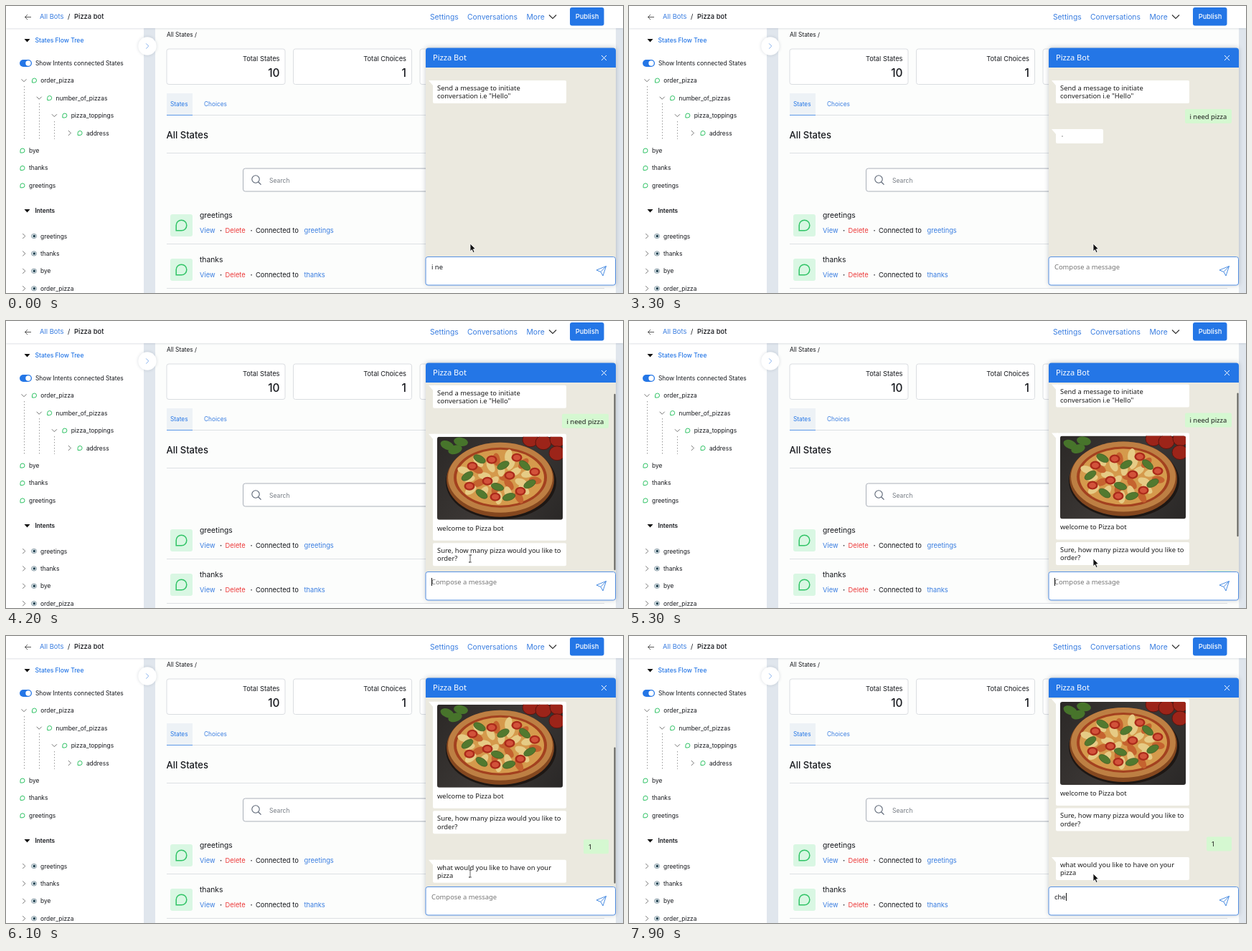
An HTML page with a canvas that plays this animation: 860 px wide and 401 px high, repeating every 8000 ms.

```html
<!DOCTYPE html>
<html lang="en">
<head>
<meta charset="utf-8">
<title>Bot builder chat</title>
<style>
html, body { margin: 0; width: 100%; height: 100%; overflow: hidden; background: #fff; }
canvas { display: block; }
</style>
</head>
<body>
<canvas id="stage" width="860" height="401"></canvas>
<script>
const ctx = document.getElementById('stage').getContext('2d');
const LOOP = 8000;
const UI = 'Inter, sans-serif', CHAT = '"Noto Sans", sans-serif';
const BLUE = '#2476e6', LINK = '#397de0', INK = '#16181d', GREEN = '#2fc365';

const TYPED = [[0, 'i ne'], [100, 'i nee'], [300, 'i need'], [500, 'i need '], [1000, 'i need p'],
  [1700, 'i need pi'], [1900, 'i need piz'], [2000, 'i need pizz'], [2100, 'i need pizza'],
  [2300, ''], [5100, '1'], [5300, ''], [7100, 'c'], [7300, 'ch'], [7500, 'che']];
const CARET_ON = [[100, 1100], [1200, 2800], [3500, 4700], [5100, 5900], [6900, LOOP]];
const IBEAM_ON = [[3800, 5300], [5900, 6900]];
const SENT = 2300, WAIT = 2450, ANSWER = 3700, SENT2 = 5300, ANSWER2 = 5900;

const clamp = v => Math.max(0, Math.min(1, v));
const easeOut = u => 1 - (1 - clamp(u)) ** 3;
const within = (spans, t) => spans.some(([a, b]) => t >= a && t < b);

function text(s, x, y, size, color = INK, { weight = 400, font = UI, align = 'left' } = {}) {
  ctx.font = `${weight} ${size}px ${font}`;
  ctx.textAlign = align;
  ctx.fillStyle = color;
  ctx.fillText(s, x, y + size * 0.36);
}
const chatText = (s, x, y, color = '#1c1c1c') => text(s, x, y, 9.4, color, { font: CHAT });

function box(x, y, w, h, r, fill, stroke, lw = 1) {
  ctx.beginPath();
  ctx.roundRect(x, y, w, h, r);
  if (fill) { ctx.fillStyle = fill; ctx.fill(); }
  if (stroke) { ctx.strokeStyle = stroke; ctx.lineWidth = lw; ctx.stroke(); }
}
function path(points, stroke, lw = 1, fill) {
  ctx.beginPath();
  points.forEach(([x, y]) => ctx.lineTo(x, y));
  if (fill) { ctx.closePath(); ctx.fillStyle = fill; ctx.fill(); }
  if (stroke) { ctx.strokeStyle = stroke; ctx.lineWidth = lw; ctx.stroke(); }
}
function oval(x, y, rx, ry, fill, stroke, lw = 1, turn = 0) {
  ctx.beginPath();
  ctx.ellipse(x, y, rx, ry, turn, 0, 7);
  if (fill) { ctx.fillStyle = fill; ctx.fill(); }
  if (stroke) { ctx.strokeStyle = stroke; ctx.lineWidth = lw; ctx.stroke(); }
}
function shadowed(color, blur, draw) {
  ctx.save();
  ctx.shadowColor = color;
  ctx.shadowBlur = blur;
  draw();
  ctx.restore();
}
const rule = (x, y, w, color = '#dde0e4') => { ctx.fillStyle = color; ctx.fillRect(x, y, w, 1); };
const chevronDown = (x, y, w, color, lw) => path([[x - w, y - w / 2], [x, y + w / 2], [x + w, y - w / 2]], color, lw);
const chevronRight = (x, y, w, color, lw) => path([[x - w / 2, y - w], [x + w / 2, y], [x - w / 2, y + w]], color, lw);
const triangle = (x, y) => path([[x - 4, y - 2], [x + 4, y - 2], [x, y + 2.5]], null, 0, '#111');

function speech(x, y, r, lw) {
  ctx.beginPath();
  ctx.arc(x, y, r, Math.PI, Math.PI * 2.5);
  ctx.lineTo(x - r, y + r);
  ctx.closePath();
  ctx.strokeStyle = GREEN;
  ctx.lineWidth = lw;
  ctx.stroke();
}

function topBar() {
  shadowed('rgba(40,55,75,.25)', 3, () => box(0, 0, 860, 31, 0, '#fff'));
  path([[35, 15.5], [26.5, 15.5]], '#444', .9);
  path([[30, 12], [26.5, 15.5], [30, 19]], '#444', .9);
  text('All Bots', 47, 15, 9.4, LINK);
  text('/', 86, 15, 9.4);
  text('Pizza bot', 95, 15, 9.4, INK, { weight: 500 });
  text('Settings', 591, 15, 10.3, LINK);
  text('Conversations', 643, 15, 10.3, LINK);
  text('More', 725.5, 15, 10.3, LINK);
  chevronDown(762, 15, 5, '#333', 1.2);
  box(786, 2, 47.5, 25.5, 3, BLUE);
  text('Publish', 810, 15, 9.3, '#fff', { weight: 500, align: 'center' });
}

function sidebar() {
  box(0, 31, 192, 370, 0, '#fff');
  triangle(29.5, 48);
  text('States Flow Tree', 40.5, 48, 8.55, BLUE, { weight: 500 });
  box(19, 75, 17, 10, 5, BLUE);
  oval(31, 80, 3.7, 3.7, '#fff');
  text('Show Intents connected States', 41, 80, 8.4);

  ctx.setLineDash([1.5, 2.5]);
  [[25, 112], [46, 136], [67, 161]].forEach(([x, y]) => path([[x + .5, y], [x + .5, 186]], '#999', 1));
  ctx.setLineDash([]);
  ['order_pizza', 'number_of_pizzas', 'pizza_toppings', 'address'].forEach((name, i) => {
    const x = 25 + i * 21.2, y = 104 + i * 24.5;
    if (i < 3) chevronDown(x, y, 3.5, '#666', .9);
    else chevronRight(x, y, 3.5, '#666', .9);
    speech(x + 14.5, y, 3, 1);
    text(name, x + 23.3, y, 8.4);
  });
  ['bye', 'thanks', 'greetings'].forEach((name, i) => {
    const y = 202 + i * 24.4;
    speech(23, y, 3, 1);
    text(name, 32, y, 8.4);
  });

  triangle(29.5, 286);
  text('Intents', 40.5, 286, 8.3, INK, { weight: 600 });
  ['greetings', 'thanks', 'bye', 'order_pizza'].forEach((name, i) => {
    const y = 321.5 + i * 24.4;
    chevronRight(25, y, 3.5, '#666', .9);
    oval(39, y, 3.6, 3.2, '#dbe6ea', '#7b8f9a', .8);
    oval(39.3, y, 1.7, 1.7, '#1d3d4c');
    text(name, 48, y, 8.4);
  });
}

function card(x, label, value) {
  box(x + .5, 60, 165, 49.5, 3, '#fff', '#dadde1');
  text(label, x + 158, 74, 9.3, INK, { align: 'right' });
  text(value, x + 158, 93.5, 15.4, INK, { weight: 500, align: 'right' });
}

function stateRow(name, y) {
  box(229, y - 2, 31, 31, 3, '#d9f7e3');
  speech(244.5, y + 13.5, 7.3, 1.5);
  text(name, 270, y - .3, 10.3);
  const ly = y + 20.5;
  text('View', 270, ly, 9.3, LINK);
  text('·', 298, ly, 9.4, INK, { weight: 700 });
  text('Delete', 305.5, ly, 9.3, '#ec3a3a');
  text('·', 340.5, ly, 9.4, INK, { weight: 700 });
  text('Connected to', 348, ly, 9.4);
  text(name, 415.5, ly, 9.3, LINK);
}

function mainArea() {
  box(208, 31, 642, 370, 0, '#fcfdfc');
  text('All States /', 224, 40.5, 8.3);
  card(223.5, 'Total States', '10');
  card(400, 'Total Choices', '1');
  card(576.5, '', '');
  box(224, 122, 36, 31, 0, '#edf2f6');
  rule(224, 152, 610);
  rule(224, 152, 36, '#5c98e8');
  text('States', 229, 137.5, 8.3, BLUE);
  text('Choices', 276, 137.5, 8.3, LINK);
  text('All States', 223.5, 180.6, 13, INK, { weight: 500 });
  rule(224, 205, 610);
  box(330.5, 227, 398, 32, 3, '#fff', '#aab0b9');
  oval(348, 242, 5.2, 5.2, null, '#5a6474', 1.1);
  path([[351.8, 246], [355.5, 249.7]], '#5a6474', 1.2);
  text('Search', 367, 243.5, 8.6, '#757b83');
  stateRow('greetings', 293);
  rule(224, 332, 610);
  stateRow('thanks', 355);
  rule(224, 394, 610);
  shadowed('rgba(40,60,90,.18)', 4, () => oval(197, 56, 12.7, 12.7, '#fff'));
  chevronRight(197, 56, 3.6, '#86b2ee', 1);
}

function bubble(y, w, h, tail = true) {
  box(595, y, w, h, 2, '#fff');
  if (tail) path([[589, y], [598, y], [598, y + 8], [595, y + 7]], null, 0, '#fff');
}
function reply(s, x, y) {
  box(x, y, 840 - x, 20, 2, '#d5f8d1');
  chatText(s, x + 6.5, y + 10.5);
}

function waiting(y, elapsed) {
  bubble(y, 66, 20);
  const p = elapsed % 800;
  for (let i = 0; i < 3; i++) {
    const grow = clamp((p - i * 100) / 150) * clamp((800 - p) / 200);
    if (!grow) continue;
    ctx.globalAlpha = grow;
    oval(604 + i * 6, y + 10, 2.8 * grow, 2.8 * grow, '#111');
    ctx.globalAlpha = 1;
  }
}

function pizza(x, y) {
  ctx.save();
  ctx.beginPath();
  ctx.roundRect(x, y, 175, 116, 3);
  ctx.clip();
  ctx.translate(x, y);
  const board = ctx.createLinearGradient(0, 0, 175, 116);
  board.addColorStop(0, '#2b2826');
  board.addColorStop(.5, '#3c3836');
  board.addColorStop(1, '#2a2827');
  ctx.fillStyle = board;
  ctx.fillRect(0, 0, 175, 116);
  [[130, 4], [148, 8], [168, 4], [167, 23]].forEach(([a, b]) => oval(a, b, 11, 10, '#9c2419', '#5c140e'));
  [[14, 12, .4], [25, 18, -.3], [33, 7, .2]].forEach(([a, b, r]) => oval(a, b, 10, 6, '#47742b', null, 0, r));
  oval(89, 63, 77, 52, '#1d1714');
  oval(88, 60, 75, 52, '#84471f');
  oval(88, 57, 73, 49, '#bd7f43');
  oval(88, 57, 65, 42, '#a3411f');
  oval(88, 57, 61, 39, '#d59a4c');
  for (let i = 0; i < 26; i++) {
    const a = i * 2.4, d = Math.sqrt((i + .5) / 26);
    oval(88 + 54 * d * Math.cos(a), 57 + 33 * d * Math.sin(a), 9, 5, i % 3 ? '#e6cb85' : '#c5632f', null, 0, a);
  }
  [[49, 41], [76, 32], [111, 29], [136, 49], [101, 54], [70, 62], [45, 69], [116, 76], [81, 84]].forEach(([a, b]) => {
    oval(a, b, 7.5, 6, '#ab2a1a');
    oval(a, b, 5, 3.8, '#d2523a');
  });
  [[59, 31, .5], [92, 40, -.5], [122, 40, .7], [84, 70, .3], [42, 55, -.6], [129, 66, -.5], [62, 80, .6], [100, 84, -.3]]
    .forEach(([a, b, r]) => oval(a, b, 9, 4.8, '#52792f', '#3a5a22', .7, r));
  ctx.restore();
}

function scrollAt(t) {
  if (t < ANSWER) return 0;
  if (t < SENT2) return 15 * easeOut((t - ANSWER) / 800);
  if (t < ANSWER2) return 15 + 56 * easeOut((t - SENT2) / 400);
  return 71 + 13 * easeOut((t - ANSWER2) / 600);
}

function messages(t) {
  const scroll = scrollAt(t);
  ctx.save();
  ctx.beginPath();
  ctx.rect(585, 86, 265, 264);
  ctx.clip();
  ctx.save();
  ctx.translate(0, -scroll);
  bubble(104, 186, 32);
  chatText('Send a message to initiate', 601, 114.5);
  chatText('conversation i.e "Hello"', 601, 125.7);
  if (t >= SENT) reply('i need pizza', 775, 144);
  if (t >= WAIT && t < ANSWER) waiting(172, t - WAIT);
  if (t >= ANSWER) {
    bubble(172, 186, 149);
    pizza(601, 176);
    chatText('welcome to Pizza bot', 601, 303.5);
    bubble(324.5, 186, 32, false);
    chatText('Sure, how many pizza would you like to', 601, 335);
    chatText('order?', 601, 346.3);
  }
  if (t >= SENT2) reply('1', 805, 364.5);
  if (t >= SENT2 && t < ANSWER2) waiting(392.5, t - SENT2);
  if (t >= ANSWER2) {
    bubble(393, 186, 32);
    chatText('what would you like to have on your', 601, 403.5);
    chatText('pizza', 601, 414.8);
  }
  ctx.restore();
  if (t >= ANSWER) {
    const max = t < SENT2 ? 15 : t < ANSWER2 ? 71 : 84;
    const length = 259 - .82 * max;
    ctx.globalAlpha = 1 - clamp((t - 7400) / 450);
    box(847.5, 349 - length - (max - scroll) * .86, 2, length, 1, '#5f5f5c');
    ctx.globalAlpha = 1;
  }
  ctx.restore();
}

function composer(t) {
  box(585, 350.5, 264.5, 39.5, 3, '#fff', '#5590e3');
  const typed = TYPED.filter(([at]) => at <= t).pop()[1];
  chatText(typed || 'Compose a message', 593, 364.5, typed ? INK : '#777');
  if (within(CARET_ON, t)) {
    const x = typed ? 593 + ctx.measureText(typed).width : 592.5;
    ctx.fillStyle = '#111';
    ctx.fillRect(Math.round(x), 359, 1, 11);
  }
  path([[823, 369], [836.5, 363.5], [832, 377], [829, 371.5], [823, 369]], '#4a8de2', 1);
  path([[829, 371.5], [836.5, 363.5]], '#4a8de2', 1);
}

function pointer(t) {
  if (within(IBEAM_ON, t)) {
    const beam = [[645, 327], [649, 327], [647, 327], [647, 337], [645, 337], [649, 337]];
    path(beam, '#fff', 1.6);
    path(beam, '#444', .8);
  } else {
    path([[647, 332], [647, 342.8], [649.4, 340.6], [651.2, 344.6], [653, 343.8], [651.3, 339.8], [654.4, 339.5], [647, 332]],
      '#fff', .8, '#111');
  }
}

function chatPanel(t) {
  shadowed('rgba(30,40,60,.25)', 6, () => box(585, 58, 265, 332, 4, '#ebe9df'));
  box(585, 58.5, 265, 27.5, [4, 4, 0, 0], BLUE);
  text('Pizza Bot', 595, 72.5, 11.1, '#fff', { font: CHAT });
  path([[830, 69], [837, 76]], '#fff', 1);
  path([[837, 69], [830, 76]], '#fff', 1);
  messages(t);
  composer(t);
  pointer(t);
}

function render(t) {
  box(0, 0, 860, 401, 0, '#e0e6ed');
  sidebar();
  mainArea();
  topBar();
  chatPanel(t);
}

const start = performance.now();
function tick() {
  render((performance.now() - start) % LOOP);
  requestAnimationFrame(tick);
}
tick();
</script>
</body>
</html>
```
